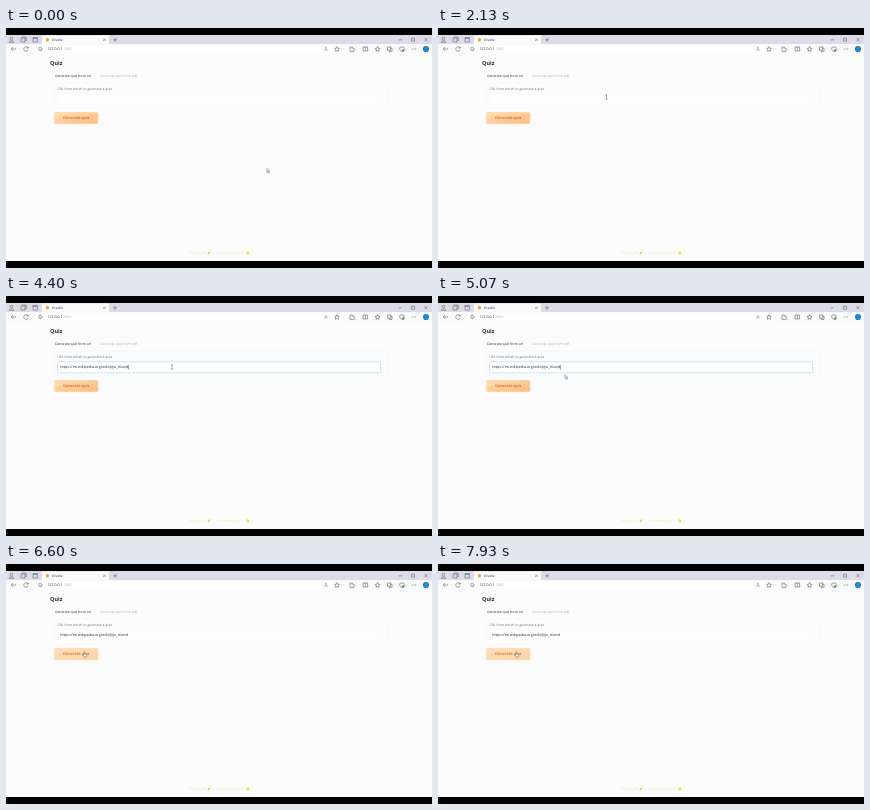
An HTML page that plays this animation: 426 px wide and 240 px high, repeating every 8000 ms.

```html
<!DOCTYPE html>
<html lang="en">
<head>
<meta charset="utf-8">
<title>Quiz</title>
<style>
  html, body { margin: 0; width: 100%; height: 100%; overflow: hidden; background: #000; }
  svg { display: block; width: 100vw; height: 100vh; }
  text { font: 34.2px "Open Sans", "Noto Sans", sans-serif; text-rendering: geometricPrecision; }
  .icon { fill: none; stroke: #666; stroke-width: .6; }
  .faint { fill: none; stroke: #f5f5ec; stroke-width: .6; }
  .footer { fill: #eeeaa8; }
</style>
</head>
<body>
<svg viewBox="0 0 426 240">
  <defs>
    <linearGradient id="idle" x2="1" y2="1">
      <stop stop-color="#ffe0b5"/><stop offset="1" stop-color="#fdba7c"/>
    </linearGradient>
    <linearGradient id="hover" x2="1" y2="1">
      <stop stop-color="#ffdfb8"/><stop offset="1" stop-color="#fed3a8"/>
    </linearGradient>
  </defs>

  <!-- Browser window -->
  <rect y="7" width="426" height="226" fill="#fcfcfd"/>
  <rect y="7" width="426" height="9.5" fill="#dcdce8"/>
  <rect y="16" width="426" height="10" fill="#fafafb"/>
  <path d="M36 16.5V9q0-1.5 1.5-1.5h64q1.5 0 1.5 1.5v7.5z" fill="#fafafb"/>
  <rect x="29" y="17" width="308" height="8" rx="2" fill="#fff"/>
  <circle cx="41.5" cy="11.8" r="1.7" fill="#f6a52b"/>
  <circle cx="420" cy="21" r="3.1" fill="#2486c8"/>
  <g class="icon">
    <circle cx="5.5" cy="10.5" r="1.3"/><path d="M3.3 14.3q2.2-3.4 4.4 0z"/>
    <path d="M15 10h4v4h-4zM16.2 10V9h4v4h-1M27 9.5h4.4v4.5H27zM27 10.5h4.4"/>
    <path d="M97.2 10.7l2.2 2.2m0-2.2l-2.2 2.2M107 11.8h4m-2-2v4"/>
    <path d="M392.5 11.8h3.5M405.5 10.2h3v3h-3zM418.5 10.2l3 3m0-3l-3 3"/>
    <path d="M10 21H5.2m2-2l-2 2 2 2M22 19.8a2.3 2.3 0 1 0 .2 2m0-3.3v1.6h-1.6"/>
    <circle cx="34.3" cy="21" r="1.7"/><path d="M34.3 20.8v1"/>
    <path d="M318.5 23l1.4-4 1.4 4m-2.3-1.3h1.8" stroke="#999"/>
    <path id="star" d="M331 18.6l.7 1.6 1.8.2-1.3 1.2.4 1.8-1.6-.9-1.6.9.4-1.8-1.3-1.2 1.8-.2z"/>
    <use href="#star" x="40.5"/>
    <path d="M344 19h2.4v1.2h1.8v3.2H344zM357 19h4.6v4H357zm2.3 0v4"/>
    <path d="M381.5 19h3.2v3.2h-3.2zM383 22.2v1.2h3V20h-1.3"/>
    <path d="M396 18.8l2.3.8v1.6q-.4 1.7-2.3 2.3-1.9-.6-2.3-2.3v-1.6z"/>
  </g>
  <circle cx="397.3" cy="22.5" r="1.2" fill="#4a9a55"/>
  <path d="M406.2 21h4" stroke="#555" stroke-linecap="round" stroke-width=".8" stroke-dasharray="0 1.7"/>

  <!-- Page -->
  <rect class="faint" x="48.3" y="55.3" width="333.4" height="24.7" rx="1.5"/>
  <rect id="field" x="51.5" y="65.8" width="323" height="11" rx="1.3" stroke-width=".7"/>
  <path id="caret" d="M122.3 69v4.6" stroke="#222" stroke-width=".5"/>
  <rect id="button" x="48.4" y="84.3" width="43.5" height="11.5" rx="1.6" stroke="#fbd3a5" stroke-width=".6"/>
  <path d="M201.4 226.5l1-2.2 2.2-1.2-.9 2.3z" fill="#e0cc38"/>
  <circle cx="241.7" cy="224.8" r="1.6" fill="#f5df45"/>

  <!-- Text is laid out ten times larger so that small glyphs keep exact spacing -->
  <g transform="scale(.1)">
    <text x="460" y="130" fill="#333">Gradio</text>
    <text x="415" y="224" fill="#222" style="font-size:35.5px">127.0.0.1<tspan fill="#aaa">:7860</tspan></text>
    <text x="440" y="371" fill="#1f2733" style="font-size:55px;font-weight:700">Quiz</text>
    <text x="489" y="491" fill="#1f2733">Generate quiz from url</text>
    <text x="940" y="491" fill="#a3a8cc">Generate quiz from pdf</text>
    <text x="512" y="615" fill="#6b717d">URL from which to generate a quiz</text>
    <text id="url" x="542" y="723" fill="#1f2733" style="font-size:36.6px">https://en.wikipedia.org/wiki/Jeju_Island</text>
    <text x="702" y="913" text-anchor="middle" fill="#d8651c" style="font-size:39px;font-weight:600">Generate quiz</text>
    <g class="footer">
      <text x="825" y="260" transform="translate(1000 2000)" visibility="hidden"></text>
      <text x="1825" y="2260">Use via API</text>
      <text x="2070" y="2260">·</text>
      <text x="2110" y="2260">Built with Gradio</text>
    </g>
  </g>

  <!-- Pointer shapes, each with its hot spot at 0,0 -->
  <g id="pointer">
    <path id="arrow" d="M0 0v4l1-.8.7 1.5.7-.3-.7-1.5h1.2z" fill="#fff" stroke="#565c78" stroke-width=".5"/>
    <path id="beam" d="M-.9-2.2h1.8M0-2.2v4.4m-.9 0h1.8" fill="none" stroke="#555" stroke-width=".5"/>
    <path id="hand" d="M-.4 0q.5-.6 1 0v1.7l2 .5v1.5l-.6 1.2H0l-1.6-2 .4-.5.8.5z" fill="#fff" stroke="#4b4b55" stroke-width=".5"/>
  </g>
</svg>
<script>
  const LOOP = 8000, FOCUS = 2600, PASTE = 3900, BLUR = 5650;
  // Pointer stops: time, x, y
  const path = [
    [0, 261, 140.5], [700, 261, 140.5], [1800, 168.5, 69], [2250, 168.5, 69],
    [2550, 166, 71], [4700, 166, 71], [5500, 78.3, 88.2], [LOOP, 78.3, 88.2]
  ];
  const el = id => document.getElementById(id);
  const show = (id, on) => el(id).setAttribute('visibility', on ? 'visible' : 'hidden');
  const ease = p => p * p * (3 - 2 * p);

  function pointerAt(t) {
    const next = path.findIndex(stop => stop[0] > t);
    const [t0, x0, y0] = path[next - 1], [t1, x1, y1] = path[next];
    const p = ease((t - t0) / (t1 - t0));
    return [x0 + (x1 - x0) * p, y0 + (y1 - y0) * p];
  }

  function draw(now) {
    const t = now % LOOP;
    const [x, y] = pointerAt(t);
    const inside = (left, top, right, bottom) => x > left && x < right && y > top && y < bottom;
    const overField = inside(51, 65, 375, 77), overButton = inside(48, 84, 92, 96);
    const focused = t >= FOCUS && t < BLUR;

    el('pointer').setAttribute('transform', `translate(${x} ${y})`);
    show('arrow', !overField && !overButton);
    show('beam', overField);
    show('hand', overButton);
    show('url', t >= PASTE);
    show('caret', focused && t >= PASTE && (t - PASTE) % 1060 < 530);
    el('field').setAttribute('fill', focused ? '#fff' : '#fdfdfd');
    el('field').setAttribute('stroke', focused ? '#b4dcf4' : '#f8f8f4');
    el('button').setAttribute('fill', `url(#${overButton ? 'hover' : 'idle'})`);
  }

  function tick() {
    draw(performance.now());
    requestAnimationFrame(tick);
  }
  tick();
</script>
</body>
</html>
```
